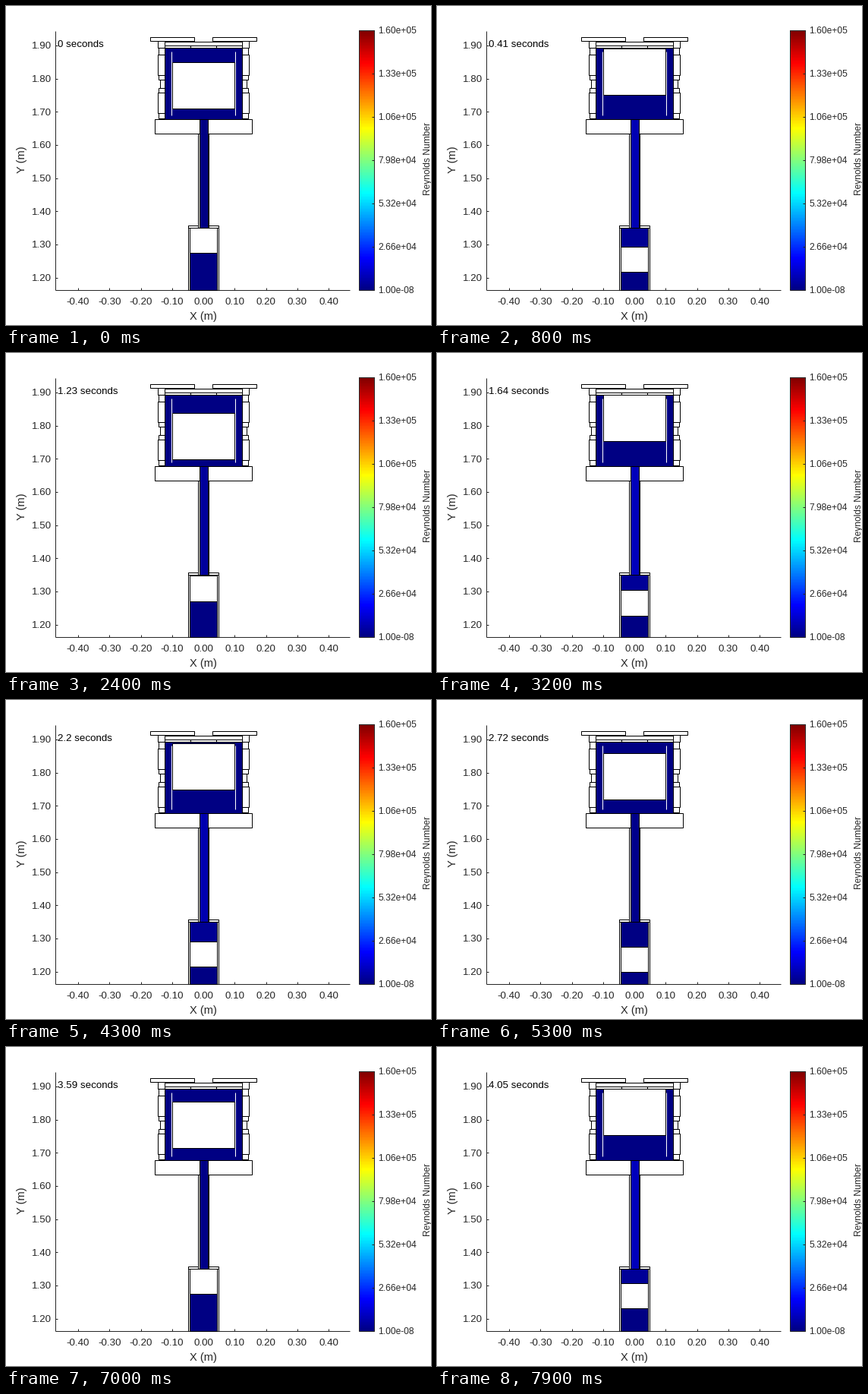
A matplotlib script for the animation above (8000 ms loop, 560 px wide and 420 px high).

```python
import numpy as np
import matplotlib.pyplot as plt
from matplotlib.animation import FuncAnimation
from matplotlib.colors import ListedColormap
from matplotlib.patches import Rectangle

W, H, DPI = 560, 420, 100
FRAMES, INTERVAL = 80, 100
STEP = 0.05125        # simulated seconds per frame
OMEGA = 600           # degrees per second, 100 rpm
PHASE = 2
PX = 72 / DPI         # points per pixel
INK, GREY = "black", "#262626"
MID = 260


def jet(levels=256):
    v = (np.arange(levels) + 1) * 4 / levels
    ramp = [np.minimum(v - 1.5, 4.5 - v), np.minimum(v - 0.5, 3.5 - v),
            np.minimum(v + 0.5, 2.5 - v)]
    return np.clip(np.stack(ramp, axis=1), 0, 1)


JET = jet()

plt.rcParams["font.family"] = "Liberation Sans"
fig = plt.figure(figsize=(W / DPI, H / DPI), dpi=DPI, facecolor="white")
ax = fig.add_axes([0, 0, 1, 1])


def set_view():
    # strokes snap half a pixel right and up, so whole numbers hit pixels
    ax.set_xlim(0, W)
    ax.set_ylim(H - 1, -1)
    ax.axis("off")


def line(xs, ys, color=INK, z=3):
    ax.plot(xs, ys, color=color, lw=PX, zorder=z, solid_capstyle="butt")


def box(x0, y0, x1, y1, fill="white", edge=INK, z=2):
    patch = Rectangle((x0, y0), x1 - x0, y1 - y0, facecolor=fill,
                      edgecolor=edge, lw=PX, zorder=z, joinstyle="miter")
    return ax.add_patch(patch)


def mirrored(x0, y0, x1, y1):
    box(x0, y0, x1, y1)
    box(2 * MID - x1, y0, 2 * MID - x0, y1)


def label(x, y, s, size, ha="center", color=GREY, **kw):
    return ax.text(x, y, s, fontsize=size * PX, ha=ha, va="baseline",
                   color=color, zorder=6, **kw)


def draw_axes():
    line([65, 65], [32, 373], GREY)
    line([65, 453], [373, 373], GREY)
    for i in range(8):
        y = 51 + 43.67 * i
        line([65, 68], [y, y], GREY)
        label(60, y + 4.2, f"{1.9 - 0.1 * i:.2f}", 13.33, "right")
    for i in range(-4, 5):
        x = MID + 41.25 * i
        line([x, x], [370, 373], GREY)
        label(x, 392, f"{i / 10:.2f}", 13.33)
    label(MID - 0.5, 412, "X (m)", 14.67)
    label(25.5, 200.7, "Y (m)", 14.67, rotation=90, rotation_mode="anchor")


def draw_colorbar():
    ax.imshow(np.arange(len(JET))[:, None], cmap=ListedColormap(JET),
              extent=(465, 486, 373, 31), origin="lower", aspect="auto",
              interpolation="nearest", zorder=1)
    box(465, 31, 485, 373, fill="none", edge=GREY)
    names = ["1.60e+05", "1.33e+05", "1.06e+05", "7.98e+04",
             "5.32e+04", "2.66e+04", "1.00e-08"]
    for i, name in enumerate(names):
        y = 31 + 57 * i
        line([482, 485], [y, y], GREY)
        label(490.4, y + 4, name, 12, "left")
    label(559, 199.7, "Reynolds Number", 12, rotation=90,
          rotation_mode="anchor")


def draw_casing():
    mirrored(190, 40, 248, 45)
    mirrored(200, 45, 209, 54)
    box(209, 46, 311, 54)
    line([209, 311], [51, 51])
    line([248, 272], [46, 46])
    line([243, 243], [51, 54])
    line([277, 277], [51, 54])
    mirrored(201, 54, 209, 96)
    mirrored(203, 96, 209, 107)
    mirrored(201, 107, 209, 147)
    mirrored(200, 63, 209, 90)
    mirrored(200, 113, 209, 140)
    box(196, 148, 324, 167)
    box(253, 167, 267, 291)
    mirrored(240, 288, 253, 291)
    for x in (240, 280):
        line([x, x], [288, 373])
    box(209, 54, 311, 148, fill=JET[0])
    for wall in (218, 302):
        line([wall, wall], [59, 143], "white", z=4)


draw_axes()
draw_colorbar()
draw_casing()
set_view()
chamber = box(242, 291, 278, 373, fill=JET[0])
crankcase = box(242, 325, 278, 373, fill=JET[0], z=4)
tube = box(255, 148, 266, 291, fill=JET[0], z=3)
displacer = box(219, 73, 301, 135, z=5)
piston = box(242, 291, 278, 325, z=5)
clock = label(68.4, 53, "", 13.33, "left", INK)


def place(rect, top, bottom):
    rect.set_y(top)
    rect.set_height(bottom - top)


def update(n):
    t = n * STEP
    a = np.radians(OMEGA * t + PHASE)
    s, c = np.sin(a), np.cos(a)

    # slider-crank motion, the two cranks 90 degrees apart
    upper = 130.9 + 16.3 * s + 2.5 * c * c
    lower = 340.9 - 16.5 * c + 2.6 * s * s
    place(displacer, max(upper - 61, 54), min(upper, 148))
    place(piston, max(lower - 33.5, 291), lower)
    place(crankcase, lower, 373)

    # gas colour follows the flow speed
    speed = abs(16.5 * s + 2.6 * np.sin(2 * a))
    tube.set_facecolor(JET[int(0.9 * speed)])
    chamber.set_facecolor(JET[int(0.35 * speed)])
    clock.set_text(f"{round(t, 2):g} seconds")
    return displacer, piston, crankcase, chamber, tube, clock


anim = FuncAnimation(fig, update, frames=FRAMES, interval=INTERVAL,
                     repeat=True, repeat_delay=0, blit=False)
plt.show()
```
